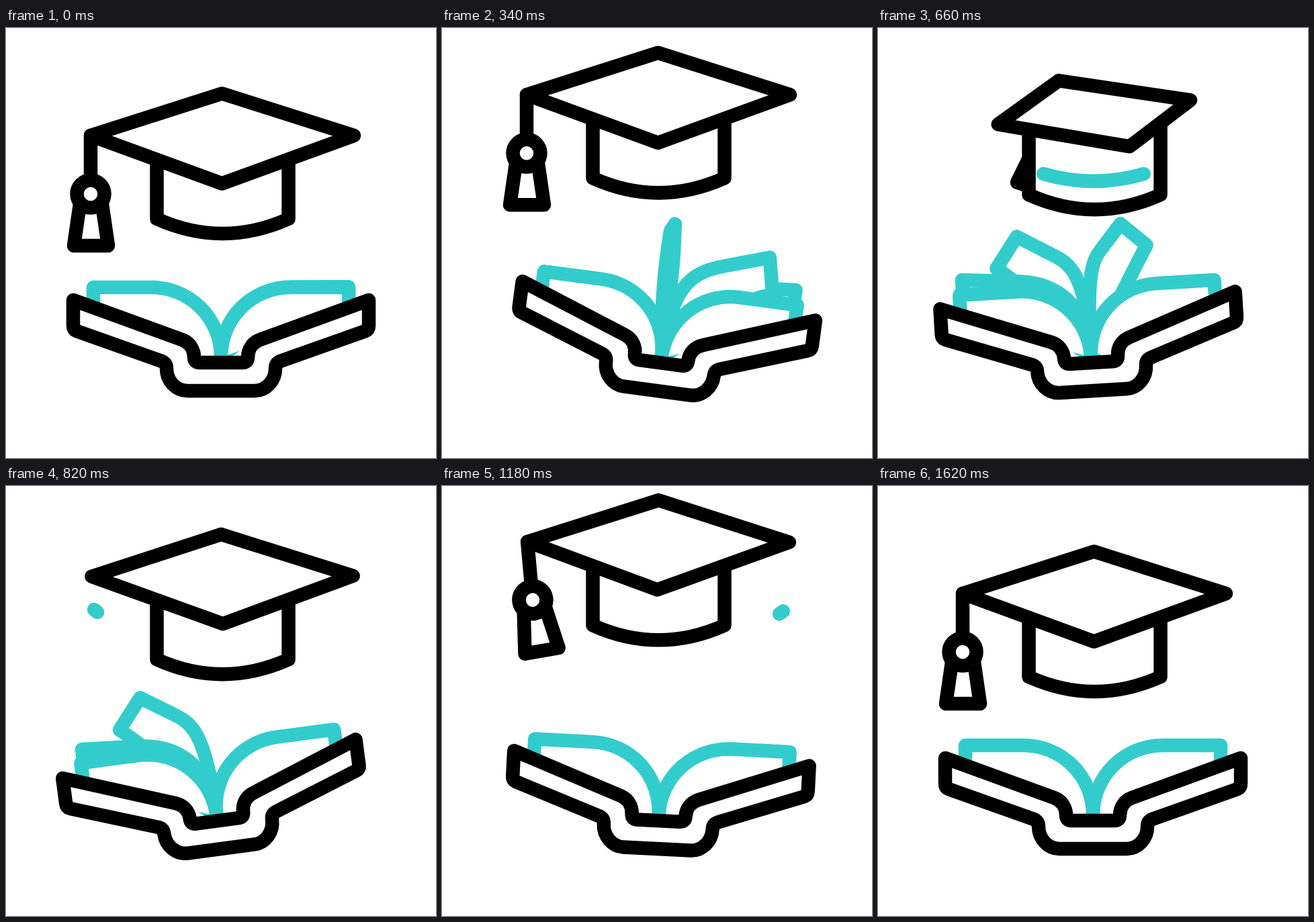
An HTML page with a canvas that plays this animation: 640 px wide and 640 px high, repeating every 1.82 s.

```html
<!DOCTYPE html>
<html lang="en">
<head>
<meta charset="utf-8">
<title>Graduation cap and book</title>
<style>
  html, body { margin: 0; width: 100%; height: 100%; overflow: hidden; background: #fff; }
  canvas { display: block; }
</style>
</head>
<body>
<canvas id="stage" width="640" height="640"></canvas>
<script>
const ctx = document.getElementById('stage').getContext('2d');
const LOOP = 1820, BEAT = 400, BLACK = '#000', TEAL = '#33cccc', RAD = Math.PI / 180;

const COVER = 'M100 405L262 464C273 468 280 478 280 490Q280 498 288 498H352Q360 498 360 490' +
  'C360 478 367 468 378 464L540 405V443Q540 449 535 451L408 496Q401 499 401 507' +
  'C401 525 387 540 370 540H270C253 540 239 525 239 507Q239 499 232 496L105 451Q100 449 100 443Z';
const LEAF = 'M320 490C320 432 366 386 424 386H510V425';
const CAP = 'M224.5 165V284Q322 328 420.5 284V165';
const BOARD = [[126, 160], [321.5, 97.5], [518, 160], [321.5, 231.5]];

const lerp = (a, b, k) => a + (b - a) * k;
const smooth = k => (1 - Math.cos(k * Math.PI)) / 2;
const progress = (t, start, end) => Math.min(1, Math.max(0, (t - start) / (end - start)));

// Eases through poses that are one beat apart
function swing(t, beat, ...poses) {
  const pos = Math.min(Math.max(t / beat, 0), poses.length - 1.001);
  const i = Math.floor(pos);
  return lerp(poses[i], poses[i + 1], smooth(pos - i));
}

function draw(d, color, fill = true) {
  const path = new Path2D(d);
  if (fill) ctx.fill(path);
  ctx.strokeStyle = color;
  ctx.stroke(path);
}

function rotate(x, y, degrees) {
  ctx.translate(x, y);
  ctx.rotate(degrees * RAD);
  ctx.translate(-x, -y);
}

function mirrored(flip, paint) {
  ctx.save();
  if (flip) { ctx.translate(640, 0); ctx.scale(-1, 1); }
  paint();
  ctx.restore();
}

// A page turning from right (0 degrees) to left (180 degrees)
function drawPage(angle) {
  const lift = Math.min(angle, 180 - angle) * RAD;
  const c = Math.max(0, Math.cos(lift)), s = Math.sin(lift);
  const x = 320 + 190 * c, y = 386 - 96 * s;
  const shoulderX = 320 + 104 * c, shoulderY = 386 - 65 * s;
  const bendX = lerp(shoulderX, x, -0.67), bendY = lerp(shoulderY, y, -0.67);
  const edgeX = x + 165 * c * s ** 6, edgeY = y + 63 * Math.sqrt(c);
  mirrored(angle > 90, () => draw(
    `M320 490C320 ${432 - 88 * s} ${bendX} ${bendY} ${shoulderX} ${shoulderY}` +
    `L${x} ${y}L${edgeX} ${edgeY}Q${320 + 115 * c ** 0.6} 390 320 490`, TEAL));
}

function drawBook(t) {
  ctx.save();
  rotate(320, 540, swing(t, BEAT, 0, 8, -7.6, 3, 0));
  // Later pages lie further back and gather speed more slowly
  for (let i = 2; i >= 0; i--) {
    const turned = progress(t, 70 * i, 720 + 140 * i) ** (0.9 + 0.45 * i);
    if (turned > 0 && turned < 1) drawPage(180 * turned);
  }
  for (const flip of [true, false]) mirrored(flip, () => draw(LEAF, TEAL));
  draw(COVER, BLACK);
  ctx.restore();
}

function drawTassel(x, y, angle) {
  ctx.save();
  ctx.translate(x - 126, y - 160);
  rotate(126, 160, angle);
  draw('M126 160V240', BLACK, false);
  rotate(126, 247, angle * 0.9);
  draw('M110 262L101 324H152L143 262Z', BLACK);
  draw('M105.5 247a20.5 20.5 0 1 0 41 0a20.5 20.5 0 1 0 -41 0Z', BLACK);
  ctx.restore();
}

function drawHat(t) {
  const turn = swing(t - BEAT, BEAT, 0, 1, 0);
  const corners = BOARD.map(([x, y], i) => {
    const [nextX, nextY] = BOARD[(i + 1) % 4];
    return [lerp(x, nextX, turn), lerp(y, nextY, turn)];
  });
  ctx.save();
  ctx.translate(0, swing(t, BEAT, 0, -64, -25.5, -77, 0));
  drawTassel(...corners[0], swing(t - BEAT, BEAT / 2, 0, 12, 0, -13, -5, 7.6, 0));
  draw(CAP, BLACK);
  draw('M' + corners.join('L') + 'Z', BLACK);
  ctx.restore();
}

// Piece of a parabola whose tail chases its head
function drawSwoosh(t, start, direction, bottom) {
  const reach = delay => direction * 190 * (2 * smooth(progress(t, start + delay, start + 415)) - 1);
  const head = reach(0), tail = reach(170);
  if (Math.abs(head - tail) < 0.5) return;
  const y = (u, v) => bottom - 0.00194 * u * v;
  draw(`M${321 + tail} ${y(tail, tail)}Q${321 + (head + tail) / 2} ${y(head, tail)} ` +
    `${321 + head} ${y(head, head)}`, TEAL, false);
}

function frame() {
  const t = performance.now() % LOOP;
  ctx.fillStyle = '#fff';
  ctx.fillRect(0, 0, 640, 640);
  ctx.lineWidth = 20.5;
  ctx.lineCap = ctx.lineJoin = 'round';
  drawBook(t);
  drawHat(t);
  drawSwoosh(t, 400, -1, 228);
  drawSwoosh(t, 790, 1, 254);
  requestAnimationFrame(frame);
}
frame();
</script>
</body>
</html>
```
